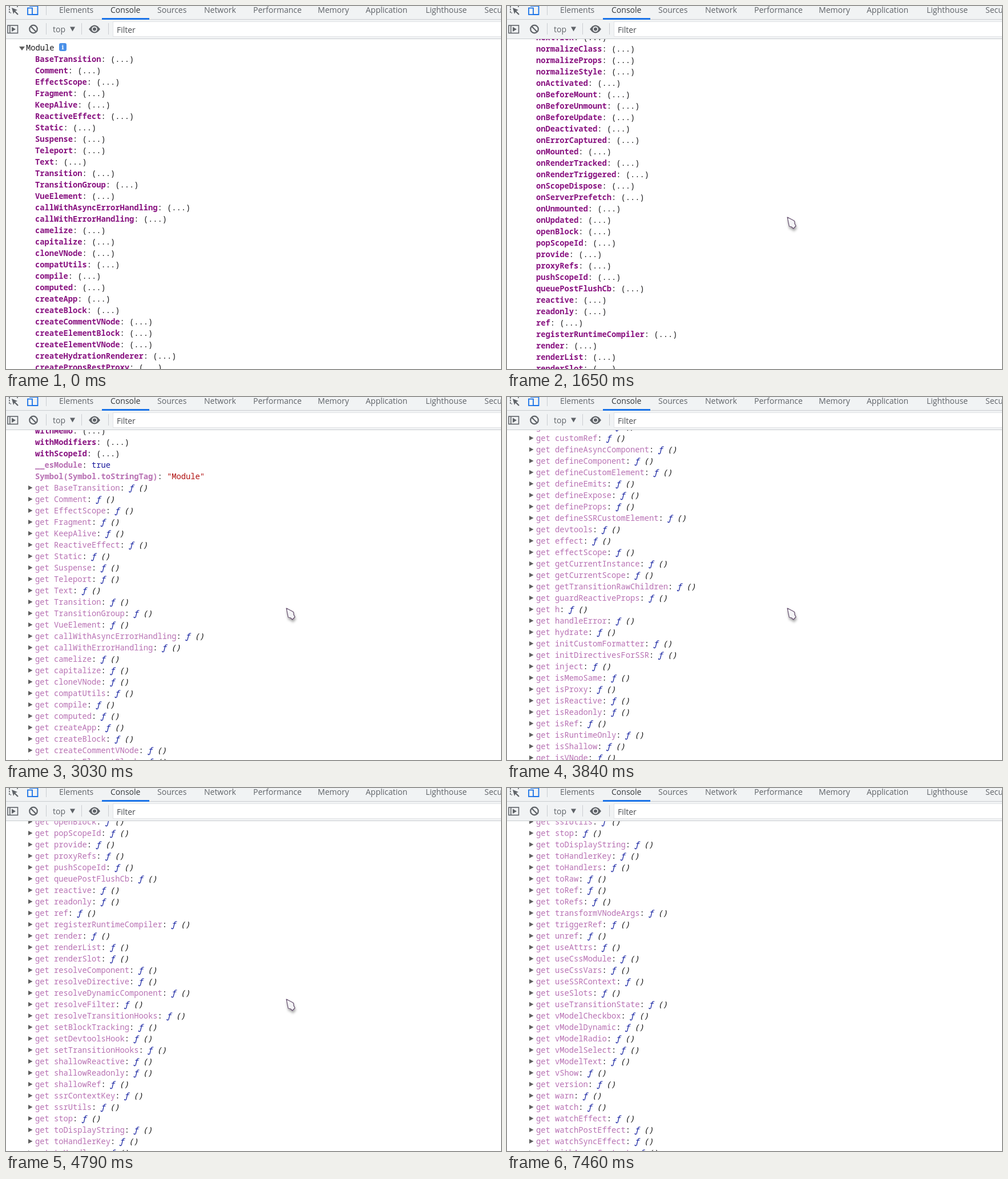
Animation of 867 by 636 pixels, one loop 7.53 s. Source, as an HTML page:

```html
<!DOCTYPE html>
<html lang="en">
<head>
<meta charset="utf-8">
<title>Console module listing</title>
<style>
html, body { margin: 0; width: 100%; height: 100%; overflow: hidden; background: #fff; }
#stage { position: relative; width: 867px; height: 636px; overflow: hidden; }
#bar { position: absolute; left: 0; top: 0; font: 14px "Open Sans", "Noto Sans", sans-serif; fill: #5f6368; }
#view { position: absolute; left: 0; top: 58px; width: 867px; height: 578px; overflow: hidden; }
#list { position: absolute; left: 0; top: 5px; will-change: transform; }
.row {
  position: relative; height: 20px; padding-left: 51px; white-space: pre; color: #1c1c1e;
  font: 13.75px/20px "Noto Sans Mono", "DejaVu Sans Mono", monospace;
}
.row b { color: #881280; }
.dim { opacity: .6; color: #881280; }
.row i { position: relative; left: -1px; color: #111; }
.row i u { color: #0d1a9e; text-decoration: none; }
.bool { color: #1a1a9c; }
.str { color: #b01010; }
.head { padding-left: 35px; }
.get::before, .head::before { content: ""; position: absolute; background: #606060; }
.get::before { left: 39px; top: 6px; width: 7.500px; height: 8px; clip-path: polygon(0 0, 100% 50%, 0 100%); }
.head::before { left: 23px; top: 8px; width: 10px; height: 7px; clip-path: polygon(0 0, 100% 0, 50% 100%); }
.info {
  position: absolute; left: 93px; top: 2px; width: 13px; height: 14px; border-radius: 3px;
  background: #4a90e8; color: #fff; text-align: center; font: bold 11px/14px "Noto Serif", serif;
}
#cursor { position: absolute; left: 0; top: 0; overflow: visible; filter: drop-shadow(1px 4px 2px rgba(0, 0, 0, .35)); }
</style>
</head>
<body>
<div id="stage">
  <div id="view"><div id="list"></div></div>
  <svg id="bar" width="867" height="58">
    <rect width="867" height="58" fill="#f1f3f4"/>
    <path d="M0 23.5H867M0 57.5H867M70.5 0V16M70.5 30V50M132.5 30V50M179.5 30V50" stroke="#cacdd1"/>
    <rect x="187.5" y="27.5" width="690" height="26" fill="#fff" stroke="#e1e3e6"/>
    <rect x="168" y="21" width="83" height="3" fill="#1a73e8"/>
    <text x="93" y="12">Elements</text>
    <text x="183" y="12" fill="#333639">Console</text>
    <text x="265" y="12">Sources</text>
    <text x="347" y="12">Network</text>
    <text x="433" y="12">Performance</text>
    <text x="546" y="12">Memory</text>
    <text x="630" y="12">Application</text>
    <text x="735" y="12">Lighthouse</text>
    <text x="838" y="12">Security</text>
    <text x="82" y="46">top</text>
    <path d="M112 36.500h9l-4.500 8z"/>
    <text x="194" y="47" fill="#4a4d51">Filter</text>
    <g fill="none" stroke="#5f6368" stroke-width="1.600">
      <path d="M6 0V12H9M20 0V2" stroke-dasharray="3 1.500"/>
      <path d="M14 8L21 15" stroke-width="2.200"/>
      <rect x="3" y="34" width="17.500" height="13.500"/>
      <path d="M6.800 34V47.500"/>
      <circle cx="48" cy="40.500" r="6.800" stroke-width="2.200"/>
      <path d="M43.300 35.800L52.700 45.200" stroke-width="2.200"/>
    </g>
    <path d="M10 3L20 7L15.500 9L13 14Z"/>
    <path d="M10 36.500L17 40.800L10 45Z"/>
    <g fill="none" stroke="#1a73e8" stroke-width="1.800">
      <path d="M41 0H55.500V15H46"/>
      <rect x="38" y="3.500" width="8" height="11.500" fill="#f1f3f4"/>
    </g>
    <path d="M145 40.500Q155 26.500 165 40.500Q155 54.500 145 40.500Z"/>
    <circle cx="155" cy="40.500" r="3.900" fill="none" stroke="#f1f3f4" stroke-width="1.800"/>
  </svg>
  <svg id="cursor" width="20" height="28">
    <path d="M1 1L12.500 7Q14.500 8.500 13.800 12L16 16.500L11.500 21L8.500 18L4.300 17Z"
      fill="#f4f4f6" stroke="#66506f" stroke-width="1.200" stroke-linejoin="round"/>
  </svg>
</div>
<script>
const names = `BaseTransition Comment EffectScope Fragment KeepAlive ReactiveEffect Static Suspense
Teleport Text Transition TransitionGroup VueElement callWithAsyncErrorHandling callWithErrorHandling
camelize capitalize cloneVNode compatUtils compile computed createApp createBlock createCommentVNode
createElementBlock createElementVNode createHydrationRenderer createPropsRestProxy createRenderer
createSSRApp createSlots createStaticVNode createTextVNode createVNode customRef defineAsyncComponent
defineComponent defineCustomElement defineEmits defineExpose defineProps defineSSRCustomElement devtools
effect effectScope getCurrentInstance getCurrentScope getTransitionRawChildren guardReactiveProps h
handleError hydrate initCustomFormatter initDirectivesForSSR inject isMemoSame isProxy isReactive
isReadonly isRef isRuntimeOnly isShallow isVNode markRaw mergeDefaults mergeProps nextTick normalizeClass
normalizeProps normalizeStyle onActivated onBeforeMount onBeforeUnmount onBeforeUpdate onDeactivated
onErrorCaptured onMounted onRenderTracked onRenderTriggered onScopeDispose onServerPrefetch onUnmounted
onUpdated openBlock popScopeId provide proxyRefs pushScopeId queuePostFlushCb reactive readonly ref
registerRuntimeCompiler render renderList renderSlot resolveComponent resolveDirective
resolveDynamicComponent resolveFilter resolveTransitionHooks setBlockTracking setDevtoolsHook
setTransitionHooks shallowReactive shallowReadonly shallowRef ssrContextKey ssrUtils stop toDisplayString
toHandlerKey toHandlers toRaw toRef toRefs transformVNodeArgs triggerRef unref useAttrs useCssModule
useCssVars useSSRContext useSlots useTransitionState vModelCheckbox vModelDynamic vModelRadio vModelSelect
vModelText vShow version warn watch watchEffect watchPostEffect watchSyncEffect withAsyncContext withCtx
withDefaults withDirectives withKeys withMemo withModifiers withScopeId`.split(/\s+/);

const row = (html, cls = "") => `<div class="row ${cls}">${html}</div>`;
const list = document.getElementById("list");
const cursor = document.getElementById("cursor");

list.innerHTML = [
  row('Module<span class="info">i</span>', "head"),
  ...names.map(n => row(`<b>${n}</b>: (...)`)),
  row('<b class="dim">__esModule</b>: <span class="bool">true</span>'),
  row('<b class="dim">Symbol(Symbol.toStringTag)</b>: <span class="str">"Module"</span>'),
  ...names.map(n => row(`<span class="dim">get ${n}</span>: <i><u>ƒ</u> ()</i>`, "get"))
].join("");

const LOOP = 7530, STEP = 70;
const ENTER = 130, LEAVE = 6730;

// Wheel bursts: start time, number of steps, offset reached
const bursts = [
  [480, 11, 1051], [1510, 17, 2790], [2940, 4, 2958],
  [3350, 11, 3897], [4310, 4, 4491], [4720, 9, 5134]
];

const stepsSince = (t, start) => Math.floor((t - start) / STEP) + 1;

function scrollAt(t) {
  let y = 0;
  for (const [start, steps, end] of bursts) {
    const k = Math.min(steps, Math.max(0, stepsSince(t, start)));
    y += (end - y) * k / steps;
    if (k < steps) break;
  }
  return Math.round(y);
}

// 0 at the resting place, above 1 outside the stage
function pointerAway(t) {
  const u = t < LEAVE
    ? Math.max(0, 6 - stepsSince(t, ENTER)) * .2
    : stepsSince(t, LEAVE) * .31;
  return u * u;
}

function draw(t) {
  const away = pointerAway(t);
  list.style.transform = `translateY(${-scrollAt(t)}px)`;
  cursor.style.transform = `translate(${490 + 296 * away}px, ${369 + 250 * away}px)`;
}

let origin;
function tick(now) {
  origin ??= now;
  draw(Math.max(0, now - origin) % LOOP);
  requestAnimationFrame(tick);
}
draw(0);
requestAnimationFrame(tick);
</script>
</body>
</html>
```
